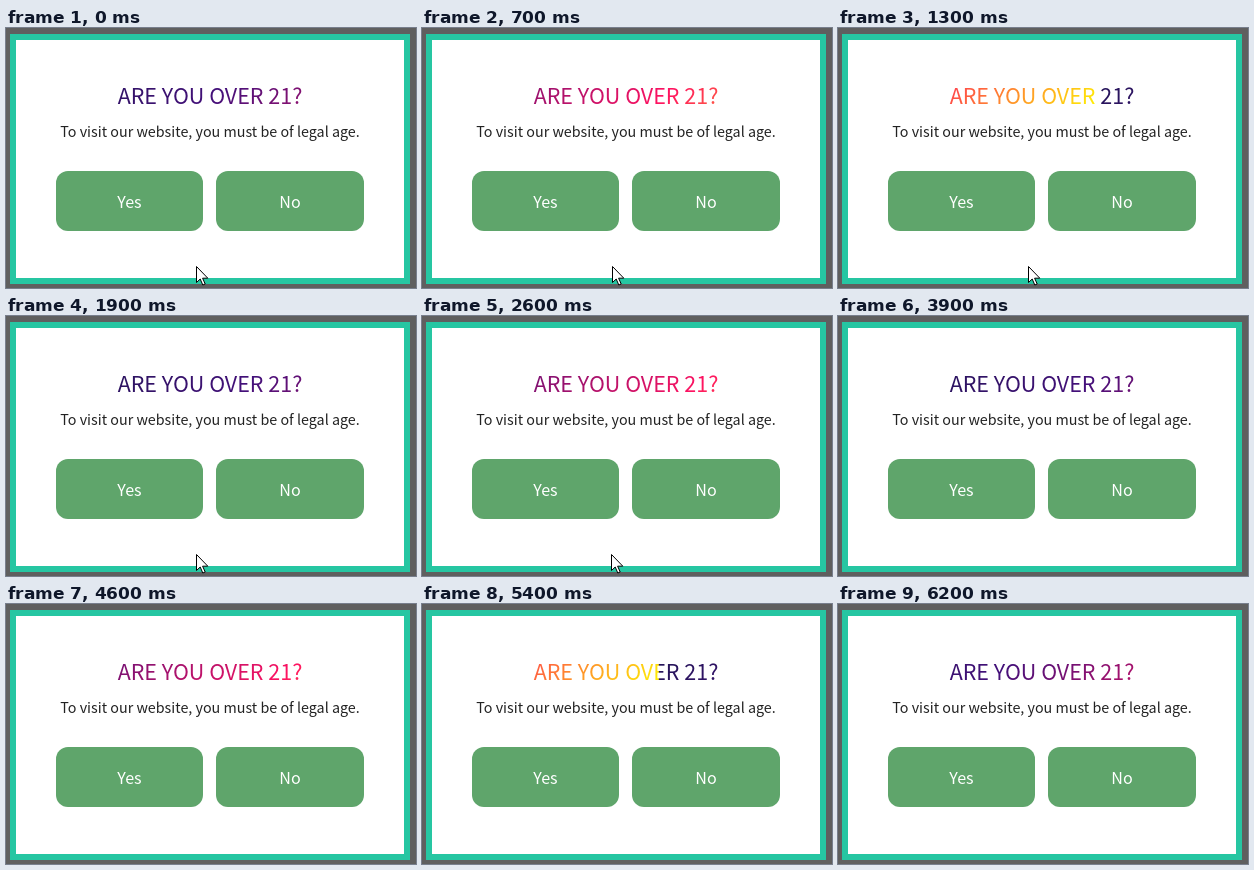
Animation, 410 px wide and 260 px high, one loop 6300 ms. Source, as an HTML page:

```html
<!DOCTYPE html>
<html lang="en">
<head>
<meta charset="utf-8">
<title>Age check</title>
<style>
  html, body { margin: 0; width: 100%; height: 100%; overflow: hidden; }
  body {
    position: relative;
    background: #5f5f5f;
    font-family: "Noto Sans CJK JP", "Noto Sans CJK SC", "Noto Sans CJK", "Open Sans", sans-serif;
  }
  body > * { position: absolute; margin: 0; text-align: center; white-space: nowrap; }
  .card {
    left: 4px; top: 6px; width: 388px; height: 238px;
    border: 6px solid #26c6a2; background: #fff;
  }
  h1 {
    left: 50px; top: 50px; width: 308px;
    font-size: 21.49px; font-weight: 400; line-height: 34px;
    color: transparent;
    background: linear-gradient(135deg, #231557, #44107a 29%, #ff1361 67%, #fff800);
    background-size: 200% 100%;
    -webkit-background-clip: text;
    background-clip: text;
  }
  p {
    left: 50px; top: 93px; width: 308px;
    font-size: 14.32px; line-height: 20px; color: #222;
  }
  .button {
    top: 143px; height: 60px; border-radius: 12px;
    background: #5fa56b; color: #fff;
    font-size: 16.11px; line-height: 60px;
  }
  .yes { left: 50px; width: 147px; }
  .no { left: 210px; width: 148px; }
  svg { left: 0; top: 0; }
</style>
</head>
<body>
<div class="card"></div>
<h1>ARE YOU OVER 21?</h1>
<p>To visit our website, you must be of legal age.</p>
<div class="button yes">Yes</div>
<div class="button no">No</div>
<svg width="14" height="22"><path d="M.5.5v16l3.7-3.5 2.6 6 2.4-1-2.6-5.8h5.2z" fill="#fff" stroke="#000"/></svg>
<script>
  const LOOP = 6300, SWEEP = 2015, TILE = 616;
  const heading = document.querySelector('h1');
  const cursor = document.querySelector('svg');
  const start = performance.now();

  function draw(now) {
    const t = Math.max(0, now - start) % LOOP;

    // The gradient tile slides left at a constant speed.
    heading.style.backgroundPositionX = 208.5 - TILE * (t - 1300) / SWEEP + 'px';

    // The pointer drifts left, then leaves through the bottom edge.
    const x = t < 2200 ? 190 : t < 2900 ? 189 : 188;
    const y = 238 + 24 * Math.min(1, Math.max(0, (t - 3600) / 300));
    cursor.style.transform = `translate(${x}px, ${y}px)`;

    requestAnimationFrame(draw);
  }
  draw(start);
</script>
</body>
</html>
```
